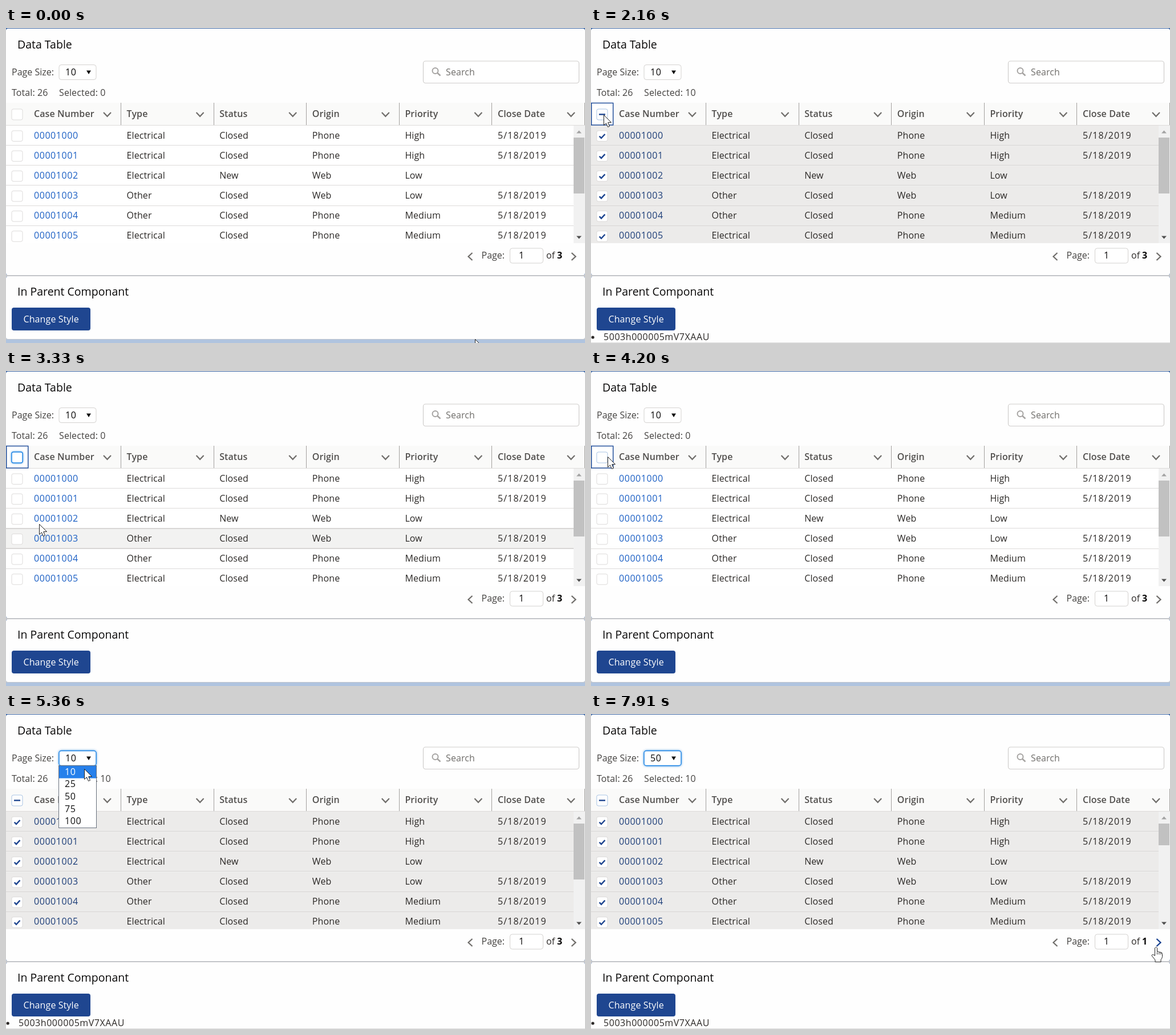
Write an HTML page with a canvas that moves like this. It is 1015x552 px and loops after 7990 ms.

```html
<!DOCTYPE html>
<html lang="en">
<head>
<meta charset="utf-8">
<title>Data Table</title>
<style>
html, body { margin: 0; width: 100%; height: 100%; overflow: hidden; background: #fff; }
canvas { display: block; }
</style>
</head>
<body>
<canvas id="stage" width="1015" height="552"></canvas>
<script>
const ctx = document.getElementById('stage').getContext('2d');
const LOOP = 7990;
const INK = '#2b2826', GREY = '#706e6b', LINE = '#dddbda', NAVY = '#1f4690';
const TOP = 171, ROW_H = 35.15, VIEW_END = 377;
const DIGIT_GAP = 0.55, DATE_GAP = 1.1;

const columns = ['Case Number', 'Type', 'Status', 'Origin', 'Priority', 'Close Date'];
const gaps = [DIGIT_GAP, 0.1, 0.1, 0.1, 0.1, DATE_GAP];
const rows = [
  ['00001000', 'Electrical', 'Closed', 'Phone', 'High', '5/18/2019'],
  ['00001001', 'Electrical', 'Closed', 'Phone', 'High', '5/18/2019'],
  ['00001002', 'Electrical', 'New', 'Web', 'Low', ''],
  ['00001003', 'Other', 'Closed', 'Web', 'Low', '5/18/2019'],
  ['00001004', 'Other', 'Closed', 'Phone', 'Medium', '5/18/2019'],
  ['00001005', 'Electrical', 'Closed', 'Phone', 'Medium', '5/18/2019']
];
const sizes = [10, 25, 50, 75, 100];
const colX = i => 49 + i * 162.6;

// Pointer legs: start, end, steps, target x, target y
const legs = [
  [70, 320, 5, 4, 129],
  [470, 620, 3, 14, 88],
  [700, 930, 4, 22, 152],
  [2480, 3110, 9, 80, 347],
  [3170, 3330, 3, 58, 268],
  [3410, 3720, 5, 45, 183],
  [3880, 4040, 3, 30, 135],
  [4120, 4200, 2, 29, 150],
  [4810, 4880, 2, 146, 101],
  [5040, 5200, 3, 140, 80],
  [5280, 5360, 2, 137, 96],
  [5440, 5660, 4, 126, 145],
  [6120, 6350, 4, 92, 110],
  [6430, 6670, 4, 126, 86],
  [6840, 7530, 10, 986, 410],
  [7910, 7910, 1, 990, 408]
];

function pointerAt(t) {
  let x = 822, y = 545;
  for (const [from, to, n, tx, ty] of legs) {
    if (t < from) break;
    const gap = n > 1 ? (to - from) / (n - 1) : 1;
    const k = Math.min(n, Math.floor((t - from) / gap + 0.01) + 1) / n;
    x += (tx - x) * k;
    y += (ty - y) * k;
  }
  return { x: Math.round(x), y: Math.round(y) };
}

const within = (t, a, b) => t >= a && t < b;

function stateAt(t) {
  const p = pointerAt(t);
  const old = pointerAt(t - 70);
  const option = Math.floor((p.y - 91) / 21.6);
  return {
    p,
    selected: within(t, 1470, 2330) || t >= 4420,
    cellFocus: within(t, 1240, 1470),
    headFocus: within(t, 1470, 5040),
    ring: within(t, 1470, 2160) || within(t, 2330, 4200) || within(t, 4420, 5040),
    hover: old.y >= TOP && old.y < VIEW_END && old.x < 995 ? Math.floor((old.y - TOP) / ROW_H) : -1,
    sizeFocus: t >= 5040,
    open: within(t, 5200, 5960),
    option: Math.max(0, Math.min(4, option)),
    size: t >= 5960 ? 50 : 10,
    onePage: t >= 6040,
    onNext: p.x > 980 && p.y > 390
  };
}

function text(s, x, y, color = INK, size = 16, weight = 400, gap = 0.1) {
  ctx.font = `${weight} ${size}px "Open Sans", "Noto Sans", sans-serif`;
  ctx.letterSpacing = gap + 'px';
  ctx.fillStyle = color;
  ctx.fillText(s, x, y);
}

function rect(x, y, w, h, color) {
  ctx.fillStyle = color;
  ctx.fillRect(x, y, w, h);
}

function box(x, y, w, h, r, fill, stroke, width = 1) {
  ctx.beginPath();
  ctx.roundRect(x, y, w, h, r);
  if (fill) { ctx.fillStyle = fill; ctx.fill(); }
  if (stroke) { ctx.strokeStyle = stroke; ctx.lineWidth = width; ctx.stroke(); }
}

// Input box with the blue focus glow
function glowBox(x, y, w, h, r) {
  ctx.save();
  ctx.shadowColor = '#0070d2';
  ctx.shadowBlur = 4;
  box(x, y, w, h, r, '#fff');
  ctx.restore();
  box(x, y, w, h, r, '#fff', '#1c84e6', 1.4);
}

function path(points, closed) {
  ctx.beginPath();
  points.forEach(([x, y]) => ctx.lineTo(x, y));
  if (closed) ctx.closePath();
}

function line(points, color, width) {
  path(points);
  ctx.strokeStyle = color;
  ctx.lineWidth = width;
  ctx.stroke();
}

function triangle(x, y, w, h, color) {
  path([[x - w / 2, y], [x + w / 2, y], [x, y + h]], true);
  ctx.fillStyle = color;
  ctx.fill();
}

function cards(s) {
  rect(0, 0, 1015, 552, '#3f68a6');
  rect(0, 432, 1015, 4, '#c3c5c9');
  box(0, 1, 1015, 432, 4, '#fefefe');
  if (s.selected) {
    box(0, 435, 1015, 125, [4, 4, 0, 0], '#fefefe');
    rect(0, 551, 1015, 1, '#dcdcdc');
  } else {
    rect(0, 540, 1015, 12, '#b0c4df');
    rect(0, 544, 1015, 2, '#bfc4cc');
    box(0, 435, 1015, 110, 4, '#fefefe');
  }
}

function toolbar(s) {
  text('Data Table', 20, 36, '#080707', 19.5, 400, 0);
  text('Page Size:', 10, 83, '#444240', 16, 400, 0);
  if (s.sizeFocus) glowBox(93, 64.5, 65, 26, 4);
  else box(93, 64.5, 65, 26, 4, '#fff', '#d4d2d0');
  text(s.size, 104, 83, '#080707', 16, 400, DIGIT_GAP);
  triangle(145, 74.5, 8, 6.5, '#111');
  text('Total: 26', 10, 119, '#444240');
  text('Selected: ' + (s.selected ? 10 : 0), 93, 119, '#444240');

  box(731.5, 58, 273, 38.5, 4, '#fff', '#cfcdcb', 1.2);
  ctx.beginPath();
  ctx.arc(752.5, 75, 5, 0, 7);
  ctx.strokeStyle = '#a5a3a1';
  ctx.lineWidth = 2;
  ctx.stroke();
  line([[756, 78.5], [761.5, 83.5]], '#a5a3a1', 2.4);
  text('Search', 771, 83, GREY);
}

function header(s) {
  rect(0, 131, 1015, 40, '#fafaf9');
  rect(0, 170, 1015, 1, LINE);
  columns.forEach((name, i) => {
    const right = 201.5 + i * 162.6;
    text(name, colX(i), 156, '#514f4d', 16, 600);
    rect(Math.round(right - 0.5), 131, 1, 39, '#a3a19f');
    line([[right - 30.5, 148], [right - 24, 154.8], [right - 17.5, 148]], GREY, 2.2);
  });
  if (s.headFocus) box(0.75, 131.5, 38, 38.5, 0, '#fff', '#24509c', 1.5);
  if (s.ring) glowBox(10, 142, 19, 19, 3);
  else box(10, 142, 19, 19, 3, '#fff', s.headFocus || s.selected ? '#a9c4e4' : LINE);
  if (s.selected) rect(14, 150.2, 11, 2.4, NAVY);
}

function body(s) {
  ctx.save();
  ctx.beginPath();
  ctx.rect(0, TOP, 1015, VIEW_END - TOP);
  ctx.clip();
  rows.forEach((row, r) => {
    const y = TOP + r * ROW_H;
    const hover = !s.selected && s.hover === r;
    rect(0, y, 995, ROW_H, s.selected ? '#ecebea' : hover ? '#f2f2f1' : '#fff');
    if (r) rect(0, Math.round(y - 1), 995, 1, s.selected ? '#d8d6d5' : LINE);
    box(10, y + 9, 19, 18.5, 3, '#fff', LINE);
    if (s.selected) line([[14.7, y + 18.6], [18, y + 22], [24.5, y + 15]], NAVY, 2.5);
    row.forEach((cell, c) => {
      const color = c ? INK : s.selected ? '#1c3d78' : '#1b5fc4';
      text(cell, colX(c), Math.round(y + 22.6), color, 16, 400, gaps[c]);
    });
  });
  if (!s.selected && s.hover >= 0) {
    for (const r of [s.hover, s.hover + 1])
      if (r) rect(0, Math.round(TOP + r * ROW_H - 1.5), 995, 2, '#d8d6d5');
  }
  if (s.cellFocus) box(40, 171.5, 161, 33, 0, null, '#24459a', 1.5);
  ctx.restore();

  rect(995, TOP, 20, VIEW_END - TOP, '#f1f1f1');
  rect(995, 192, 19, s.onePage ? 38 : 98, '#c1c1c1');
  triangle(1004.5, 184.5, 9, -5, '#a3a3a3');
  triangle(1004.5, 364.5, 9, 5, '#505050');
}

function footer(s) {
  line([[817.5, 394], [810.5, 400.5], [817.5, 407]], GREY, 2.2);
  text('Page:', 833.5, 404, '#444240', 16, 400, 0);
  box(883.5, 386, 58, 26, 4, '#fff', '#d4d2d0');
  text('1', 899, 404, '#080707');
  text('of', 947, 404, INK, 16, 400, 0);
  text(s.onePage ? 1 : 3, 966, 404, '#080707', 16, 700);
  line([[991.5, 394], [998.5, 400.5], [991.5, 407]], s.onNext ? '#17408f' : GREY, 2.3);

  text('In Parent Componant', 20, 469, '#080707', 19.5, 400, 0);
  box(10, 490, 138, 40, 4, NAVY);
  text('Change Style', 30.5, 516, '#fff');
  if (s.selected) {
    ctx.beginPath();
    ctx.arc(3.2, 542, 2.6, 0, 7);
    ctx.fillStyle = INK;
    ctx.fill();
    text('5003h000005mV7XAAU', 22, 547, INK, 16, 400, DIGIT_GAP);
  }
}

function dropdown(s) {
  rect(92, 90, 67, 110, '#68707c');
  rect(93, 91, 65, 108, '#fff');
  sizes.forEach((n, i) => {
    const y = 91 + i * 21.6;
    if (i === s.option) rect(93, y, 65, 21.6, '#2680eb');
    text(n, 103, Math.round(y + 15.7), i === s.option ? '#fff' : '#111', 16, 400, DIGIT_GAP);
  });
}

function pointer({ p, onNext }) {
  ctx.save();
  ctx.translate(p.x + 0.5, p.y + 0.5);
  if (onNext) {
    ctx.beginPath();
    ctx.moveTo(-2, 15);
    ctx.lineTo(-2, 1.5);
    ctx.quadraticCurveTo(0, -1.5, 2, 1.5);
    ctx.lineTo(2, 8);
    ctx.quadraticCurveTo(4.5, 6.5, 5.5, 9);
    ctx.quadraticCurveTo(8, 7.5, 8.5, 10);
    ctx.quadraticCurveTo(11, 9, 11, 12);
    ctx.lineTo(11, 17);
    ctx.quadraticCurveTo(10.5, 20, 8.5, 22);
    ctx.lineTo(8.5, 26);
    ctx.lineTo(-1.5, 26);
    ctx.lineTo(-1.5, 22.5);
    ctx.lineTo(-7.5, 15);
    ctx.quadraticCurveTo(-7, 11, -2, 15);
    ctx.closePath();
  } else {
    path([[0, 0], [0, 18], [4, 14.3], [7, 21], [10, 19.7], [7.2, 13.2], [13, 13]], true);
  }
  ctx.fillStyle = '#fff';
  ctx.fill();
  ctx.strokeStyle = '#222';
  ctx.lineWidth = 1;
  ctx.stroke();
  if (onNext) {
    for (const x of [2, 5.3, 8.5]) line([[x, 9], [x, 13]], '#222', 1);
  }
  ctx.restore();
}

function draw(t) {
  const s = stateAt(t);
  cards(s);
  toolbar(s);
  header(s);
  body(s);
  footer(s);
  if (s.open) dropdown(s);
  pointer(s);
}

const start = performance.now();
function tick() {
  draw((performance.now() - start) % LOOP);
  requestAnimationFrame(tick);
}
tick();
</script>
</body>
</html>
```
